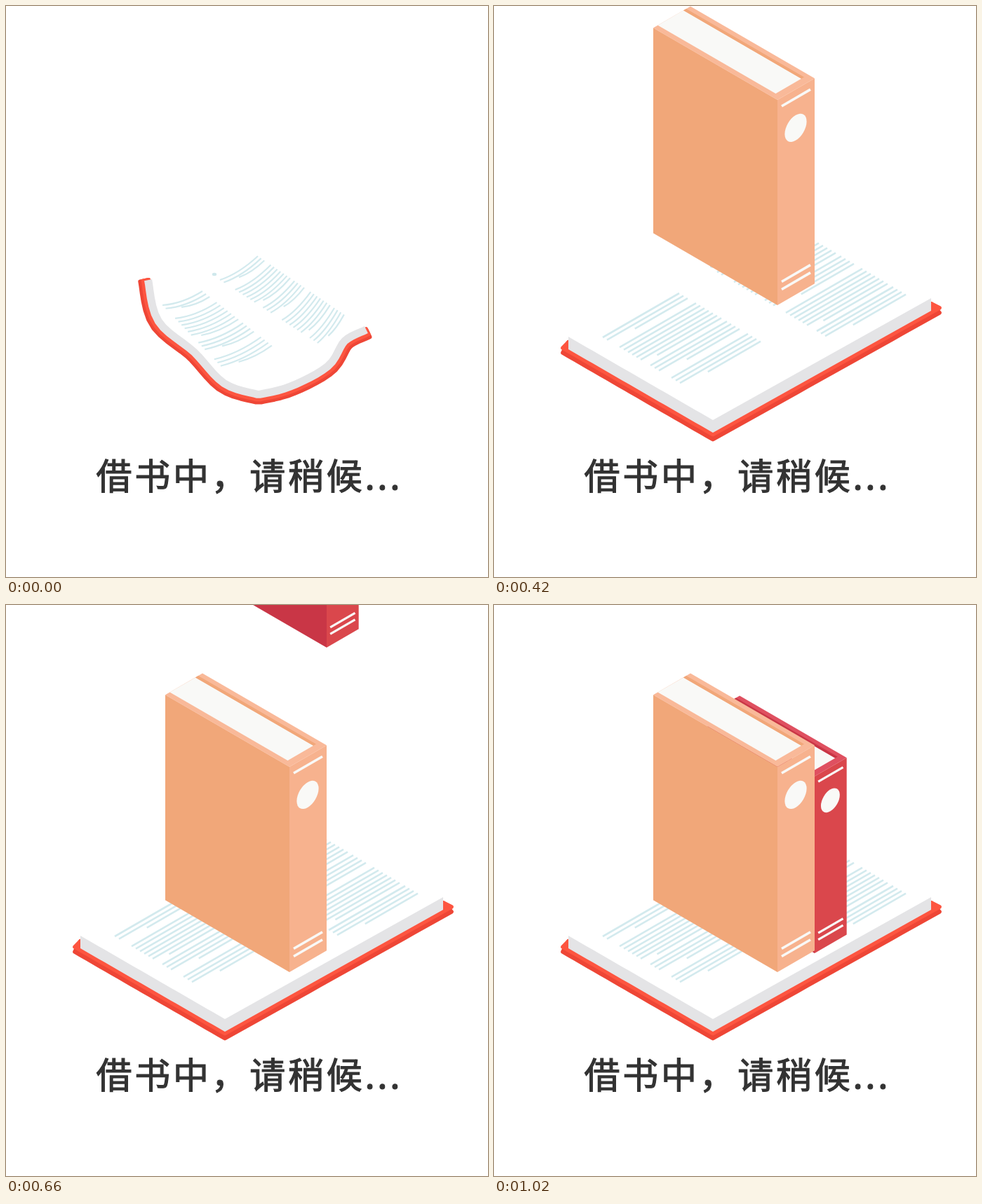
An HTML page with a canvas for the animation above (1500 ms loop, 687 by 815 pixels).

```html
<!DOCTYPE html>
<html lang="zh-CN">
<head>
<meta charset="utf-8">
<style>
  html, body { margin: 0; width: 687px; height: 815px; overflow: hidden; background: #fff; }
  canvas, svg { position: absolute; left: 0; top: 0; }
  text {
    font: 400 51px "Noto Sans CJK SC", "Noto Sans CJK", sans-serif;
    letter-spacing: 3.7px;
    fill: #333; stroke: #333; stroke-width: 1.2;
  }
</style>
</head>
<body>
<canvas id="stage" width="687" height="815"></canvas>
<svg width="687" height="815"><text x="128.5" y="690">借书中，请稍候...</text></svg>
<script>
const ctx = document.getElementById('stage').getContext('2d');
const LOOP = 1500, STEP = 30, UNFOLD = 90, FALL_SPEED = 1.6875, SLOPE = 0.58;
const clamp = (v, lo, hi) => Math.max(lo, Math.min(hi, v));
const lerp = (a, b, k) => a + (b - a) * k;
const mix = (p, q, k) => [lerp(p[0], q[0], k), lerp(p[1], q[1], k)];

function polygon(color, points, outline = 0) {
  ctx.beginPath();
  points.forEach(p => ctx.lineTo(...p));
  ctx.closePath();
  ctx.fillStyle = ctx.strokeStyle = color;
  ctx.fill();
  if (outline) {
    ctx.lineWidth = outline;
    ctx.lineJoin = 'round';
    ctx.stroke();
  }
}

function disc(color, x, y, rx, ry) {
  ctx.fillStyle = color;
  ctx.beginPath();
  ctx.ellipse(x, y, rx, ry, 0, 0, 2 * Math.PI);
  ctx.fill();
}

// Catmull-Rom spline through evenly spaced points
function spline(pts, u) {
  const n = pts.length - 1, v = clamp(u, 0, 1) * n;
  const i = Math.min(n - 1, Math.floor(v)), f = v - i;
  return [0, 1].map(c => {
    const [a, b, d, e] = [-1, 0, 1, 2].map(j => pts[clamp(i + j, 0, n)][c]);
    return b + f / 2 * (d - a + f * (2 * a - 5 * b + 4 * d - e + f * (3 * (b - d) + e - a)));
  });
}

// The two front edges of the open book: straight when flat, curved when crumpled
const edges = [
  { flat: [[106, 472], [312, 591]],
    crumpled: [[208, 390], [222, 447], [272, 490], [314, 534], [360, 549]] },
  { flat: [[312, 591], [623, 417]],
    crumpled: [[360, 549], [403, 538], [455, 510], [479, 474], [511, 457]] },
];

// Text blocks: first line's start and end, then the same for a line DEPTH further down
const DEPTH = 142;
const pages = [
  { counts: [3, 7, 4, 4],
    flat: [[155, 473], [264, 410], [297, 557], [406, 494]],
    crumpled: [[223, 427], [280, 407], [330, 539], [401, 502]] },
  { counts: [3, 7, 4, 7, 4],
    flat: [[318, 380], [427, 317], [460, 464], [569, 401]],
    crumpled: [[305, 391], [359, 357], [433, 474], [468, 431]] },
];

// Point below an edge: straight down when flat, along the curve's normal when crumpled
function below(edge, u, depth, flat) {
  const [x, y] = spline(edge.crumpled, u), mid = clamp(u, 0.01, 0.99);
  const [x0, y0] = spline(edge.crumpled, mid - 0.01), [x1, y1] = spline(edge.crumpled, mid + 0.01);
  const h = 0.62 * depth / Math.hypot(x1 - x0, y1 - y0);
  const [fx, fy] = mix(...edge.flat, u);
  return mix([x - (y1 - y0) * h, y + (x1 - x0) * h], [fx, fy + depth], flat);
}

function front(depth, overhang, flat) {
  const points = [];
  edges.forEach((edge, side) => {
    for (let i = 0; i <= 24; i++) {
      const u = side ? lerp(0, 1 + overhang, i / 24) : lerp(-overhang, 1, i / 24);
      points.push(below(edge, u, depth, flat));
    }
  });
  return points;
}

function ribbon(color, top, bottom, overhang, flat) {
  polygon(color, [...front(top, 0, flat), ...front(bottom, overhang, flat).reverse()], overhang && 6);
}

function textBlock(page, flat) {
  const [a, b, c, d] = page.flat.map((p, i) => mix(page.crumpled[i], p, flat));
  ctx.strokeStyle = '#d3eaee';
  ctx.lineWidth = lerp(2.2, 2.6, flat);
  ctx.beginPath();
  let offset = 0;
  for (const count of page.counts) {
    const long = count > 5;
    for (let i = 0; i < count; i++, offset += 6) {
      const k = offset / DEPTH, start = mix(a, c, k), end = mix(b, d, k);
      const indent = i < count - 1 ? 0 : long ? 0.16 : 0.31;
      const from = mix(start, end, indent), [mx, my] = mix(from, end, 0.5);
      ctx.moveTo(...from);
      ctx.quadraticCurveTo(mx, my + 8 * (1 - flat) * (1 - indent), ...end);
    }
    offset += long ? 2 : 6;
  }
  ctx.stroke();
}

function openBook(flat) {
  ribbon('#ee4636', 8, 27.5, 0.038, flat);
  ribbon('#fd5540', 8, 20.5, 0.038, flat);
  ribbon('#e4e4e6', 0, 18, 0, flat);
  pages.forEach(page => textBlock(page, flat));
  disc('#cfe8ec', ...mix([297, 383], [311, 371.5], flat), 3.2, 2.2);
}

// Isometric view: a runs along the cover, b along the spine's width, z upwards
const iso = (a, b, z) => [b - a, -SLOPE * (a + b) - z];

// Standing book; (x, y) is its lowest corner
function closedBook(x, y, size, [cover, spine, top]) {
  const paper = '#f9f9f7', length = 177, width = 53, height = 293;
  const level = (color, a, b0, b1) => polygon(color,
    [iso(a, b0, height), iso(length, b0, height), iso(length, b1, height), iso(a, b1, height)]);
  const wall = (color, a, b) => polygon(color,
    [iso(0, 0, 0), iso(a, b, 0), iso(a, b, height), iso(0, 0, height)]);
  ctx.save();
  ctx.translate(x, y);
  ctx.scale(size, size);
  level(top, 0, 0, width);
  level(paper, 9, 6.5, 43);
  level(cover, 9, 43, 47);
  wall(cover, length, 0);
  wall(spine, 0, width);
  ctx.strokeStyle = paper;
  ctx.lineWidth = 3.6;
  ctx.beginPath();
  for (const z of [19, 30, 280.5]) {
    ctx.moveTo(...iso(0, 6, z));
    ctx.lineTo(...iso(0, 47, z));
  }
  ctx.stroke();
  ctx.transform(1, -SLOPE, 0, 1, ...iso(0, 26, 238));
  disc(paper, 0, 0, 15.6, 18);
  ctx.restore();
}

// Steady fall past the resting place, then a straight return
function drop(t, start, turn, end, rest) {
  const fall = FALL_SPEED * (Math.min(t, turn) - start);
  return lerp(fall, rest, clamp((t - turn) / (end - turn), 0, 1));
}

function draw(t) {
  ctx.clearRect(0, 0, 687, 815);
  openBook(Math.min(1, t / UNFOLD));
  closedBook(457, drop(t, 624, 951, 1020, 497), 0.862, ['#c93646', '#da474c', '#df5060']);
  closedBook(404, drop(t, 167, 531, 600, 524), 1, ['#f1a779', '#f7b28e', '#f9b999']);
}

const start = performance.now();
function tick() {
  const t = (performance.now() - start) % LOOP;
  draw(Math.floor(t / STEP) * STEP);
  requestAnimationFrame(tick);
}
tick();
</script>
</body>
</html>
```
